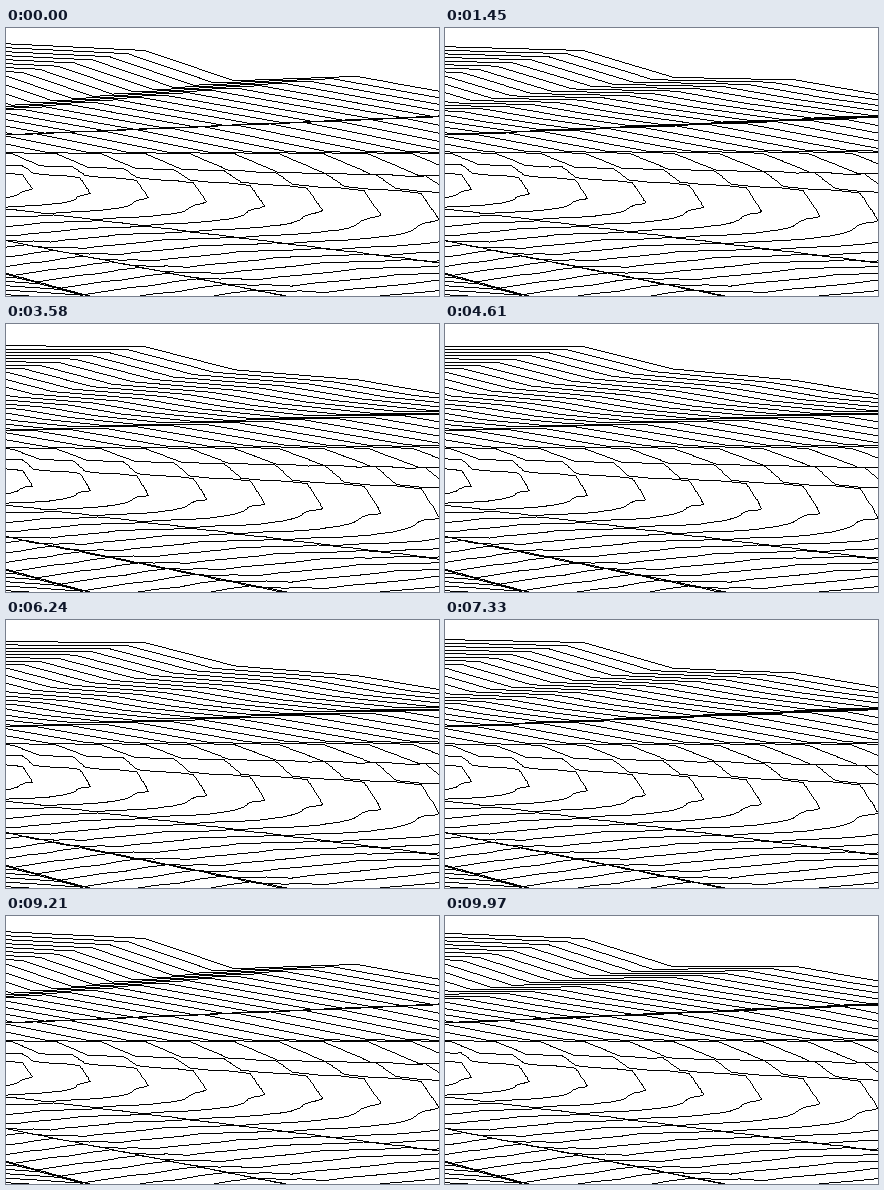
An HTML page with a canvas that plays this animation: 433 by 268 pixels, repeating every 10000 ms.

```html
<!DOCTYPE html>
<html lang="en">
<head>
<meta charset="utf-8">
<title>Contours</title>
<style>
html, body { margin: 0; width: 100%; height: 100%; overflow: hidden; background: #fff; }
canvas { display: block; }
</style>
</head>
<body>
<canvas id="stage" width="433" height="268"></canvas>
<script>
const W = 433, H = 268, LOOP = 10000;

// The picture is one profile, drawn at every whole scale around a point off stage.
const CENTER = { x: -439, y: 125.3 };
const FIRST = 7, LAST = 33;

// Key points of the profile: across, down, and how far the swing moves them down.
const CROWN = [
  [10, -3.13, -0.4], [17.5, -3.13, 0], [20.2, -2.45, 0.26], [23.9, -2.1, -0.27],
  [26.4, -1.68, -0.24], [29.8, -1.36, 0.07], [33.5, -1.35, -0.08], [40, -0.25, 0.15]
];
const FACE = [
  [44.5, -0.08, 0.1], [47.3, 0.96, 0.28], [50.5, 1.03, 0.3], [51.8, 2.18, 0],
  [56.9, 2.6, 0.05], [57.7, 3.8, 0], [58.1, 4.55, -0.2], [57.2, 4.65, -0.05],
  [55.8, 5.3, 0], [53.5, 5.7, -0.08]
];
const CHIN = [
  [48, 5.98, 0], [44.2, 5.6, -0.04], [39.5, 5.75, 0], [34.5, 6.3, 0],
  [31.4, 6.26, -0.06], [28.6, 5.65, 0.04], [23.5, 6.4, 0], [20.5, 5.65, 0], [12, 5.1, 0]
];

const ctx = document.getElementById("stage").getContext("2d");
const image = ctx.createImageData(W, H);
const pixels = new Uint32Array(image.data.buffer);
const mix = (a, b, t) => a + (b - a) * t;

function seeded(seed) {
  return () => (seed = seed * 16807 % 2147483647) / 2147483647 * 2 - 1;
}

// Splits each stretch into short pieces and shakes the joints a little.
function roughen(points, pieces, amount, random) {
  return points.slice(1).flatMap((b, i) => {
    const a = points[i];
    return Array.from({ length: pieces }, (_, n) => {
      const shake = n ? amount : 0;
      return a.map((v, j) => mix(v, b[j], n / pieces) + (j < 2 ? shake * random() : 0));
    });
  });
}

const random = seeded(71);
const PROFILE = [
  ...CROWN,
  ...roughen([...FACE, CHIN[0]], 3, 0.06, random),
  ...roughen(CHIN, 5, 0.04, random),
  CHIN[CHIN.length - 1]
];

// A bounce: quick through its low point, slow around its peak.
const LOW = -300, RISE = 5400, FALL = 3800;
function swingAt(time) {
  const t = (time - LOW) % (RISE + FALL);
  const share = t < RISE ? t / RISE : (RISE + FALL - t) / FALL;
  return 1 - Math.sin(share * Math.PI / 2);
}

// Hard-edged line, one pixel wide.
function line(x0, y0, x1, y1) {
  if (Math.max(x0, x1) < -1 || Math.min(x0, x1) > W ||
      Math.max(y0, y1) < -1 || Math.min(y0, y1) > H) return;
  const steps = Math.max(1, Math.ceil(Math.max(Math.abs(x1 - x0), Math.abs(y1 - y0))));
  for (let s = 0; s <= steps; s++) {
    const x = Math.round(mix(x0, x1, s / steps));
    const y = Math.round(mix(y0, y1, s / steps));
    if (x >= 0 && x < W && y >= 0 && y < H) pixels[y * W + x] = 0xff000000;
  }
}

function draw(time) {
  pixels.fill(0xffffffff);
  const swing = swingAt(time);
  for (let scale = FIRST; scale <= LAST; scale++) {
    const placed = PROFILE.map(([u, v, lift]) =>
      [CENTER.x + u * scale, CENTER.y + (v + lift * swing) * scale]);
    for (let i = 1; i < placed.length; i++) line(...placed[i - 1], ...placed[i]);
  }
  ctx.putImageData(image, 0, 0);
}

const start = performance.now();
function tick() {
  draw((performance.now() - start) % LOOP);
  requestAnimationFrame(tick);
}
tick();
</script>
</body>
</html>
```
